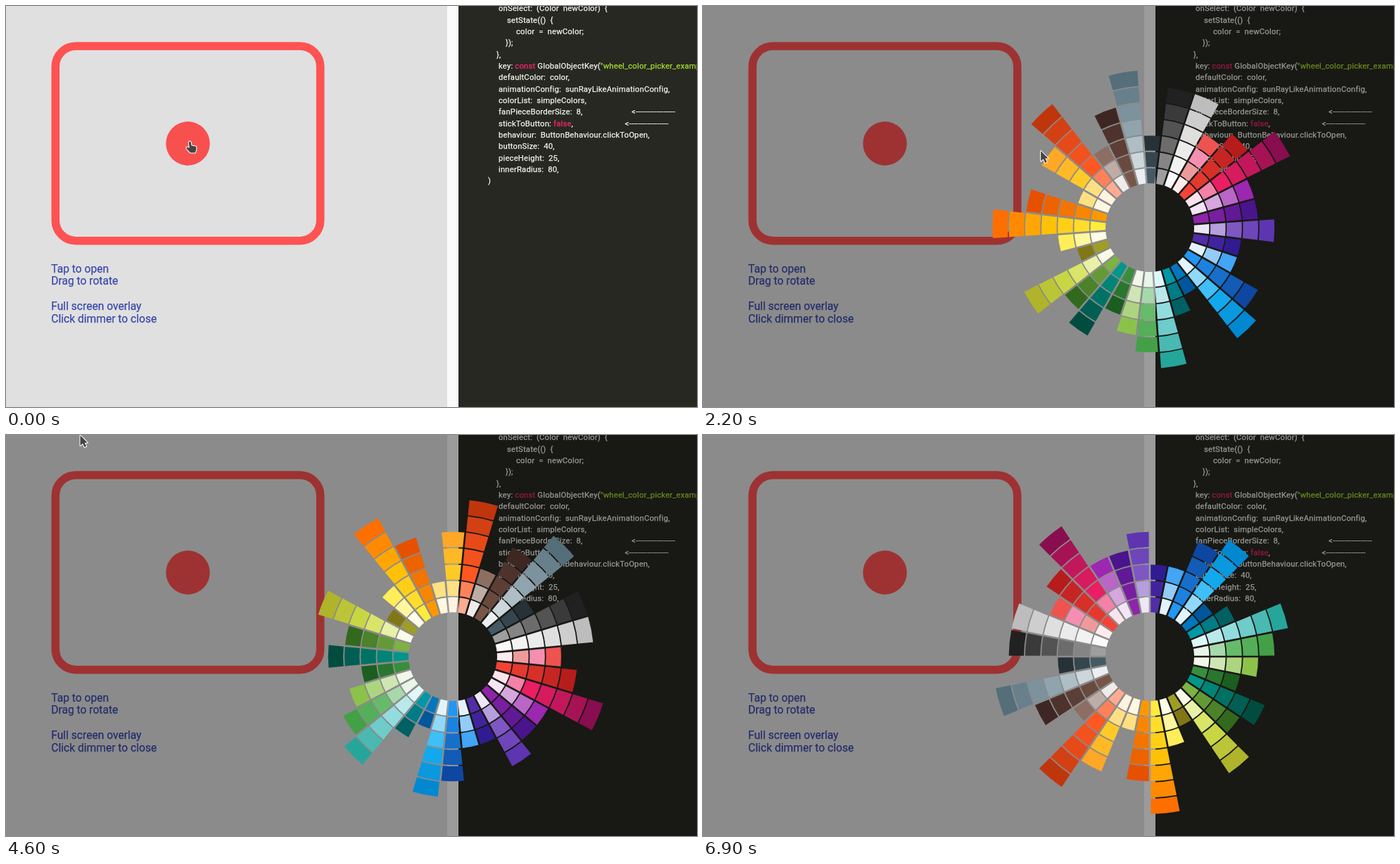
These frames come from a looping animation (982 by 570 pixels, 7500 ms). An HTML page with a canvas:

```html
<!DOCTYPE html>
<html lang="en">
<head>
<meta charset="utf-8">
<title>Colour wheel picker</title>
<style>
html, body { margin: 0; width: 100%; height: 100%; overflow: hidden; background: #e0e0e0; }
svg, canvas { position: absolute; left: 0; top: 0; width: 982px; height: 570px; }
text { font-family: Roboto, sans-serif; white-space: pre; stroke-width: .25px; }
.hint { font-size: 15.6px; fill: #3949ab; stroke: #3949ab; }
.code { font-size: 11.25px; letter-spacing: .2px; fill: #f8f8f2; stroke: #f8f8f2; }
.key { fill: #f92672; stroke: #f92672; }
.str { fill: #a6e22e; stroke: #a6e22e; }
</style>
</head>
<body>
<svg viewBox="0 0 982 570">
  <rect width="982" height="570" fill="#e0e0e0"/>
  <rect x="627" width="16" height="570" fill="#fafafa"/>
  <rect x="643" width="339" height="570" fill="#272822"/>
  <rect x="70.3" y="57" width="376.4" height="276.7" rx="29" fill="none" stroke="#ff5252" stroke-width="11.6"/>
  <circle id="button" cx="258.5" cy="195.5" r="31.2"/>
  <g class="hint" id="hint"></g>
  <g class="code" id="code"></g>
</svg>
<canvas id="stage" width="982" height="570"></canvas>
<script>
const LOOP = 7500, STEP = 100;
const CX = 635, CY = 315, INNER = 63, PITCH = 23.2, HEIGHT = 21.4, HALF_GAP = 1.3;
const RAD = Math.PI / 180;
const clamp = v => Math.min(1, Math.max(0, v));

function addLine(group, x, y, markup) {
  const el = document.createElementNS('http://www.w3.org/2000/svg', 'text');
  el.setAttribute('x', x);
  el.setAttribute('y', y);
  el.innerHTML = markup;
  document.getElementById(group).append(el);
}

['Tap to open', 'Drag to rotate', '', 'Full screen overlay', 'Click dimmer to close']
  .forEach((line, i) => addLine('hint', 64.3, 378.5 + i * 17.8, line));

// Indent of each line is counted from the closing bracket
const arrow = x => `<tspan x="${x}">&lt;${'-'.repeat(17)}</tspan>`;
[
  [15, 'onSelect:  (Color  newColor)  {'],
  [27, 'setState(()  {'],
  [40, 'color  =  newColor;'],
  [25, '});'],
  [12, '},'],
  [15, 'key: <tspan class="key">const</tspan> GlobalObjectKey(<tspan class="str">"wheel_color_picker_example"</tspan>),'],
  [15, 'defaultColor:  color,'],
  [15, 'animationConfig:  sunRayLikeAnimationConfig,'],
  [15, 'colorList:  simpleColors,'],
  [15, 'fanPieceBorderSize:  8,' + arrow(889)],
  [15, 'stickToButton: <tspan class="key">false</tspan>,' + arrow(879.5)],
  [15, 'behaviour:  ButtonBehaviour.clickToOpen,'],
  [15, 'buttonSize:  40,'],
  [15, 'pieceHeight:  25,'],
  [15, 'innerRadius:  80,'],
  [0, ')']
].forEach(([indent, line], i) => addLine('code', 685 + indent, 7.3 + i * 16.33, line));

// Clockwise rays: number of tiles, then colour stops from the hub outwards
const rays = `5 fff3e0 ffca28 ffa726
7 ffab91 ff5722 e64a19 bf360c
3 efebe9 8d6e63
5 795548 3e2723
7 eceff1 90a4ae 546e7a
3 455a64 263238
6 9e9e9e 212121
6 fafafa e7e7e7 bdbdbd
4 ffebee ef9a9a f48fb1 ef5350
5 f44336 b71c1c
7 fce4ec e91e63 c2185b 880e4f
4 f3e5f5 9c27b0
4 8e24aa 4a148c
5 ede7f6 7e57c2 5e35b1
3 512da8 311b92
3 e3f2fd 42a5f5
5 2196f3 0d47a1
6 e1f5fe 16b0f5 0288d1
2 0277bd 01579b
3 0097a7 006064
6 e0f7fa 80d5d7 26a69a
5 e8f5e9 66bb6a 43a047
4 f1f8e9 8bc34a
3 388e3c 1b5e20
5 009688 004d40
4 7cb342 33691e
6 f9fbe7 d0df4a afb42b
2 9e9d24 827717
3 fffde7 ffee58
7 ffeb3b ffc107 ff6f00
5 ff9800 e65100
2 fff8e1 ffe082`.split('\n').map(makeRay);

function blend(stops, f) {
  const at = f * (stops.length - 1), i = Math.min(Math.floor(at), stops.length - 2);
  const channel = (hex, c) => parseInt(hex.substr(c * 2, 2), 16);
  const rgb = [0, 1, 2].map(c => {
    const a = channel(stops[i], c), b = channel(stops[i + 1], c);
    return Math.round(a + (b - a) * (at - i));
  });
  return `rgb(${rgb})`;
}

// Rays leave the hub in a shuffled order, the first few well ahead
function makeRay(row, i) {
  const [count, ...stops] = row.split(' ');
  const rank = (27 * i + 14) % 32 / 31;
  const reach = 80 + 95 * rank ** 13;
  return {
    colors: Array.from({ length: +count }, (_, n) => blend(stops, n / (count - 1))),
    lag: Math.max(0, INNER + count * PITCH - reach)
  };
}

// Key points: time, then values, eased between them
const spin = [[1900, 5.6], [2450, -100.8], [2900, -100.8], [3400, 0.1], [5140, 0.1], [6600, 568.1]];
const pointer = [[500, 260, 191], [900, 287, 201], [1600, 711, 272], [1900, 700, 238],
  [2450, 312, 181], [2900, 312, 181], [3400, 704, 226], [3600, 704, 226], [3900, 76, 77],
  [4600, 105, 0], [5200, 746, 315], [6600, 571, 280], [6800, 91, 8]];

function sample(keys, t) {
  const i = keys.findIndex(k => k[0] >= t);
  if (i < 1) return keys.at(i).slice(1);
  const a = keys[i - 1], b = keys[i], x = (t - a[0]) / (b[0] - a[0]);
  const f = x * x * (3 - 2 * x);
  return a.slice(1).map((v, j) => v + (b[j + 1] - v) * f);
}

const button = document.getElementById('button');
const ctx = document.getElementById('stage').getContext('2d');
const arrowShape = new Path2D('M0 0V14.5L3.6 11.4L6 16.8L8.6 15.6L6.2 10.4H10.4Z');
const handShape = new Path2D('M-.8 2Q.6 0 2.2 2L3 7L8.6 8Q10.4 8.6 10 11L8.6 17H1.4L-4 11Q-4.6 8.6-2 9.2L.2 10.6Z');

function tile(r, shift, color) {
  const R = r + HEIGHT, half = Math.PI / 32, up = -Math.PI / 2;
  const a = half - Math.asin(HALF_GAP / r), A = half - Math.asin(HALF_GAP / R);
  ctx.beginPath();
  ctx.arc(0, shift, R, up - A, up + A);
  ctx.arc(0, shift, r, up + a, up - a, true);
  ctx.fillStyle = color;
  ctx.fill();
}

function drawWheel(t, turn) {
  // 1 at the middle of the opening, 0 when open
  const rest = (clamp((1700 - t) / 1200) * 1.5) ** 3;
  rays.forEach(({ colors, lag }, i) => {
    ctx.save();
    ctx.translate(CX, CY);
    ctx.rotate((turn + i * 11.25) * RAD);
    ctx.globalAlpha = Math.min(0.75, 0.25 + lag / 130) ** rest * clamp((t - 400) / 500);
    colors.forEach((color, n) => {
      const r = INNER + n * PITCH;
      // tiles that have not left yet wait stacked in the hub
      tile(r, Math.min(lag * rest, r + HEIGHT), color);
    });
    ctx.restore();
  });
}

// The second drag follows a circle that hangs below the hub
function dragPoint(angle) {
  const dx = Math.sin(angle * RAD), dy = -Math.cos(angle * RAD);
  const ox = 5, oy = 84, r = 135, along = ox * dx + oy * dy;
  const s = along + Math.sqrt(along * along - ox * ox - oy * oy + r * r);
  return [CX + dx * s, CY + dy * s];
}

function drawPointer(t, turn) {
  const away = (t >= 4000 && t < 4600) || t >= 6900;
  if (away) return;
  const [x, y] = t >= 5300 && t <= 6600 ? dragPoint(turn + 91) : sample(pointer, t);
  const shape = t < 600 ? handShape : arrowShape;
  ctx.save();
  ctx.translate(x + 0.5, y + 0.5);
  ctx.lineJoin = 'round';
  ctx.lineWidth = 2;
  ctx.strokeStyle = '#fff';
  ctx.stroke(shape);
  ctx.fillStyle = '#444';
  ctx.fill(shape);
  ctx.restore();
}

function render(now) {
  const t = Math.floor((now % LOOP) / STEP) * STEP;
  const [turn] = sample(spin, t);
  ctx.clearRect(0, 0, 982, 570);
  button.setAttribute('fill', t < 500 ? '#f84f4f' : '#ff5252');
  if (t >= 500) {
    ctx.fillStyle = `rgba(0,0,0,${0.38 * clamp((t - 400) / 400)})`;
    ctx.fillRect(0, 0, 982, 570);
    drawWheel(t, turn);
  }
  drawPointer(t, turn);
}

const start = performance.now();
function loop() {
  render(performance.now() - start);
  requestAnimationFrame(loop);
}
loop();
</script>
</body>
</html>
```
